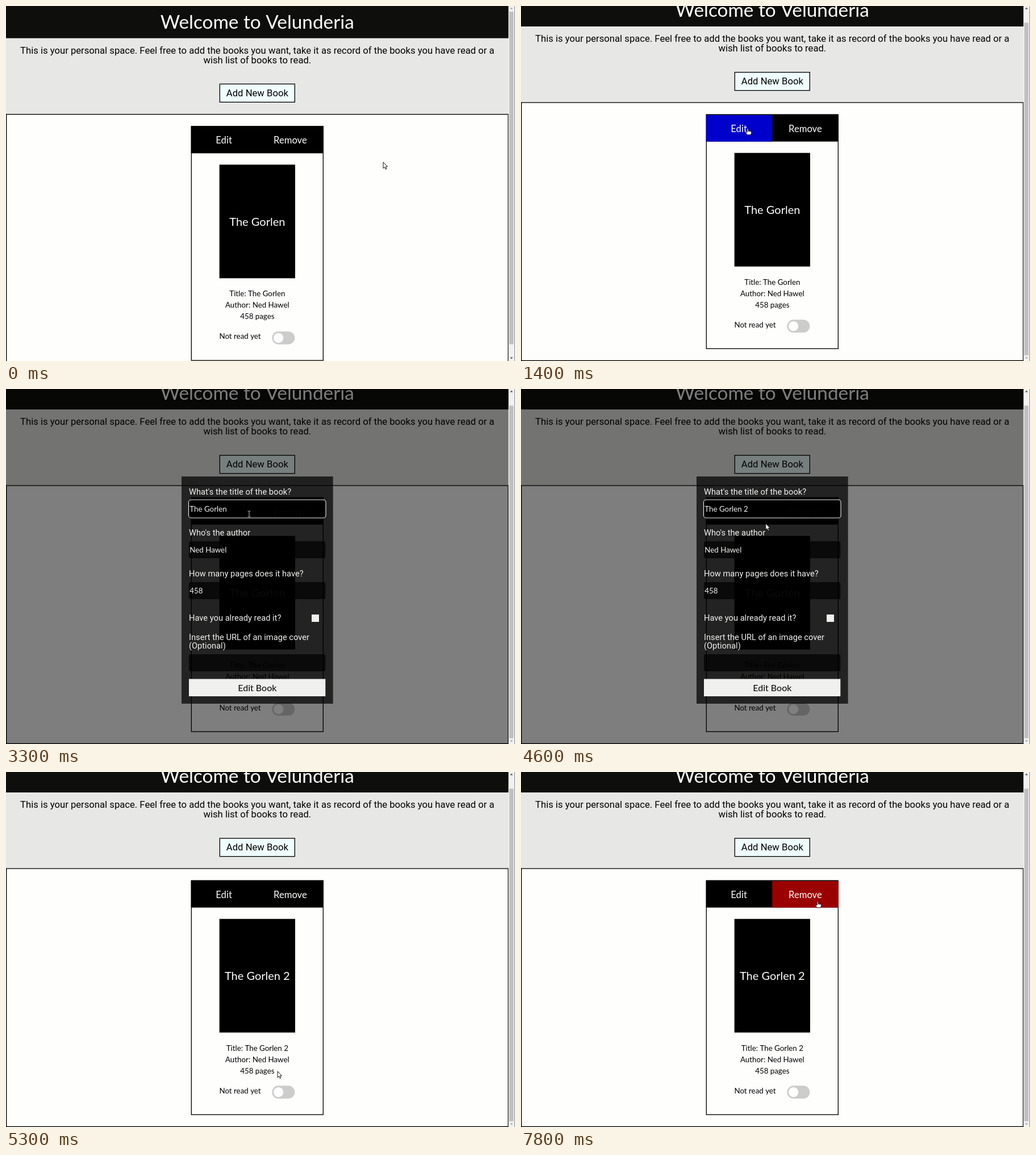
Write an HTML page with a canvas that moves like this. It is 896 px wide and 625 px high and loops after 8 s.

```html
<!DOCTYPE html>
<html lang="en">
<head>
<meta charset="utf-8">
<title>Book shelf</title>
<style>
html, body { margin: 0; width: 100%; height: 100%; overflow: hidden; background: #fefefd; }
canvas { display: block; }
</style>
</head>
<body>
<canvas id="stage" width="896" height="625"></canvas>
<script>
const ctx = document.getElementById('stage').getContext('2d');
const LOOP = 8000, STEP = 100;
const WIDTH = 884.67, MID = WIDTH / 2, SCROLL = 20.67, LINE = 1.33;
const LATO = 'Lato, sans-serif', ROBOTO = 'Roboto, sans-serif';
const BOOK = 'The Gorlen', AUTHOR = 'Ned Hawel';
const PAPER = '#fefefd', LIGHT = '#f0f0ee';

// Pointer waypoints: time, x, y
const TRACK = [
  [0, 664, 275], [400, 664, 275], [800, 590, 262], [1200, 415, 222], [1300, 415, 222],
  [1400, 399, 215], [1800, 399, 215], [1900, 400, 217], [2200, 400, 217],
  [2400, 413, 245], [2700, 428, 220], [4500, 428, 220], [5200, 478, 527],
  [5400, 478, 527], [6000, 489, 564], [7200, 489, 564], [7500, 555, 380],
  [7700, 540, 243], [7800, 522, 227], [8000, 522, 227]
];

const ramp = (t, a, b) => Math.min(1, Math.max(0, (t - a) / (b - a)));
const smooth = p => p * p * (3 - 2 * p);
const mix = (a, b, p) => a + (b - a) * p;

function pointer(t) {
  const i = Math.max(1, TRACK.findIndex(k => k[0] > t));
  const [t0, x0, y0] = TRACK[i - 1], [t1, x1, y1] = TRACK[i];
  const p = smooth(ramp(t, t0, t1));
  return [mix(x0, x1, p), mix(y0, y1, p)];
}

function box(x, y, w, h, color) {
  ctx.fillStyle = color;
  ctx.fillRect(x, y, w, h);
}

function frame(x, y, w, h) {
  ctx.strokeStyle = '#000';
  ctx.lineWidth = LINE;
  ctx.strokeRect(x + LINE / 2, y + LINE / 2, w - LINE, h - LINE);
}

function round(x, y, w, h, r, color) {
  ctx.beginPath();
  ctx.roundRect(x, y, w, h, r);
  ctx.fillStyle = color;
  ctx.fill();
}

function text(str, x, y, size, family, color = '#000', align = 'center') {
  ctx.font = `${size}px ${family}`;
  ctx.textAlign = align;
  ctx.fillStyle = color;
  ctx.fillText(str, x, y);
}

function drawToggle(on) {
  const p = smooth(on);
  const x = mix(468.33, 469.67, on > 0 ? 1 : 0);
  const color = `rgb(${mix(204, 38, p)},${mix(204, 151, p)},${mix(204, 236, p)})`;
  round(x, 573, 40, 22.67, 11.33, color);
  ctx.beginPath();
  ctx.arc(x + 11.33 + 17.33 * p, 584.33, 8.67, 0, 7);
  ctx.fillStyle = '#fff';
  ctx.fill();
}

function drawCard(t) {
  const title = t < 5300 ? BOOK : BOOK + ' 2';
  const read = t >= 6000 && t < 6700;
  const blue = t < 1900 ? ramp(t, 900, 1200) : 0.55 * (1 - ramp(t, 1900, 2100));
  const red = ramp(t, 7600, 7800);

  frame(325.67, 211.33, 233.33, 413.33);
  box(325.67, 211.33, 233.33, 48, '#000');
  if (blue) box(326, 212.67, MID - 326, 46.67, `rgb(0,0,${205 * blue})`);
  if (red) box(MID, 212.67, 558.67 - MID, 46.67, `rgb(${155 * red},0,0)`);
  text('Edit', 383.6, 242.4, 16.67, LATO, PAPER);
  text('Remove', 500.4, 242.4, 16.67, LATO, PAPER);

  box(375.67, 279.33, 133.33, 200, '#000');
  text(title, MID, 387, 20, LATO, PAPER);
  text('Title: ' + title, MID, 511.3, 13.33, LATO);
  text('Author: ' + AUTHOR, MID, 531.3, 13.33, LATO);
  text('458 pages', MID, 551.3, 13.33, LATO);
  text(read ? 'Already read' : 'Not read yet', 412, 586.3, 13.33, LATO);
  drawToggle(t < 6700 ? ramp(t, 5970, 6400) : 1 - ramp(t, 6670, 7100));
}

function drawPage(t, top) {
  ctx.save();
  ctx.translate(0, -top);
  box(0, 0, WIDTH, 650, PAPER);
  box(0, 0, WIDTH, 190, '#e7e7e5');
  box(0, 0, WIDTH, 56.67, '#0e0e0c');
  text('Welcome to Velunderia', MID, 39.5, 33.33, LATO, PAPER);
  text('This is your personal space. Feel free to add the books you want, take it as record of the books you have read or a',
    MID, 84, 16.67, ROBOTO);
  text('wish list of books to read.', MID, 100.7, 16.67, ROBOTO);
  box(375.67, 136.67, 133.33, 33.33, '#effefd');
  frame(375.67, 136.67, 133.33, 33.33);
  text('Add New Book', MID, 159, 16.67, ROBOTO);
  frame(0, 190, WIDTH, 455.67);
  drawCard(t);
  ctx.restore();
}

function drawScrollbar(top) {
  box(WIDTH, 0, 896 - WIDTH, 625, '#f1f1f0');
  box(886, 10 + top * 0.937, 7.4, 585.5, '#c0c0c0');
  box(895, 0, 1, 625, '#8a8a8a');
  const arrow = (y, d, active) => {
    ctx.beginPath();
    ctx.moveTo(887.3, y);
    ctx.lineTo(892.3, y);
    ctx.lineTo(889.8, y + d);
    ctx.fillStyle = active ? '#505050' : '#a3a3a3';
    ctx.fill();
  };
  arrow(5.5, -3, top > 0);
  arrow(618.5, 3, top < SCROLL);
}

function drawModal(t) {
  const focus = t >= 2700 && t < 5200;
  const caret = focus && !(t >= 3300 && t < 3500) && !(t >= 4400 && t < 5000);
  const title = BOOK + (t < 3500 ? '' : t < 3700 ? ' ' : ' 2');
  const hover = ramp(t, 4900, 5200);
  const shade = 'rgba(0,0,0,.72)';
  const label = (str, y) => text(str, 322, y, 14.67, ROBOTO, LIGHT, 'left');
  const field = (y, str = '') => {
    round(322, y, 240.3, 30, 3.3, shade);
    text(str, 323.3, y + 20.2, 13.33, LATO, LIGHT, 'left');
  };

  box(0, 0, WIDTH, 625, 'rgba(0,0,0,.5)');
  box(309, 154, 266.67, 400, shade);

  label("What's the title of the book?", 186.2);
  label("Who's the author", 258.2);
  label('How many pages does it have?', 330.2);
  label('Have you already read it?', 408.3);
  label('Insert the URL of an image cover', 442.3);
  label('(Optional)', 457);

  if (focus) {
    round(321.5, 195, 241.5, 32, 4.5, 'rgba(0,0,0,.6)');
    ctx.strokeStyle = LIGHT;
    ctx.lineWidth = 1.2;
    ctx.stroke();
  }
  field(196, title);
  if (caret) box(323.3 + ctx.measureText(title).width, 203, 0.9, 16, LIGHT);
  field(268, AUTHOR);
  field(340, '458');
  field(467);

  box(538, 397, 13, 13, LIGHT);
  const c = [mix(240, 48, hover), mix(240, 0, hover), mix(238, 47, hover)];
  box(322, 510.5, 240.3, 30.5, `rgb(${c})`);
  text('Edit Book', MID, 532, 16, LATO, hover > 0.4 ? PAPER : '#000');
}

const SHAPES = {
  arrow: new Path2D('M0 0V10.8L2.4 8.6L4.2 12.4L6 11.6L4.3 7.9H7.6Z'),
  hand: new Path2D('M-1 1Q0 -.6 1 1V4.6L5.6 5.4Q7 6 6.8 8L5.6 11.8H-.8L-4 7.6Q-3.6 6 -1 7.8Z'),
  beam: new Path2D('M-2.5 -5H-.7L0 -4.4L.7 -5H2.5M0 -4.4V4.4M-2.5 5H-.7L0 4.4L.7 5H2.5')
};

function cursorKind(x, y, modal, top) {
  const within = (l, t, r, b) => x >= l && x <= r && y >= t && y <= b;
  if (modal) {
    return [196, 268, 340, 467].some(f => within(322, f, 562, f + 30)) ? 'beam' : 'arrow';
  }
  const head = 212 - top;
  return within(326, head, 559, head + 47) || within(469, 552, 510, 576) ? 'hand' : 'arrow';
}

function drawCursor(t, modal, top) {
  const [x, y] = pointer(t);
  const kind = cursorKind(x, y, modal, top), shape = SHAPES[kind];
  ctx.save();
  ctx.translate(x, y);
  ctx.lineJoin = 'round';
  if (kind === 'beam') {
    ctx.strokeStyle = '#000';
    ctx.lineWidth = 2;
    ctx.stroke(shape);
    ctx.strokeStyle = '#d8d8d6';
    ctx.lineWidth = 0.9;
    ctx.stroke(shape);
  } else {
    ctx.fillStyle = '#fff';
    ctx.fill(shape);
    ctx.strokeStyle = '#111';
    ctx.lineWidth = 1;
    ctx.stroke(shape);
    if (kind === 'hand') {
      ctx.lineWidth = 0.6;
      ctx.stroke(new Path2D('M1 4.5V7M3 5V7M5 5.4V7'));
    }
  }
  ctx.restore();
}

function draw() {
  const now = performance.now() % LOOP;
  const t = Math.floor(now / STEP) * STEP;
  const top = SCROLL * smooth(ramp(t, 600, 1000));
  const modal = t >= 1900 && t < 5300;
  drawPage(t, top);
  if (modal) drawModal(t);
  drawScrollbar(top);
  drawCursor(t, modal, top);
  requestAnimationFrame(draw);
}
draw();
</script>
</body>
</html>
```
